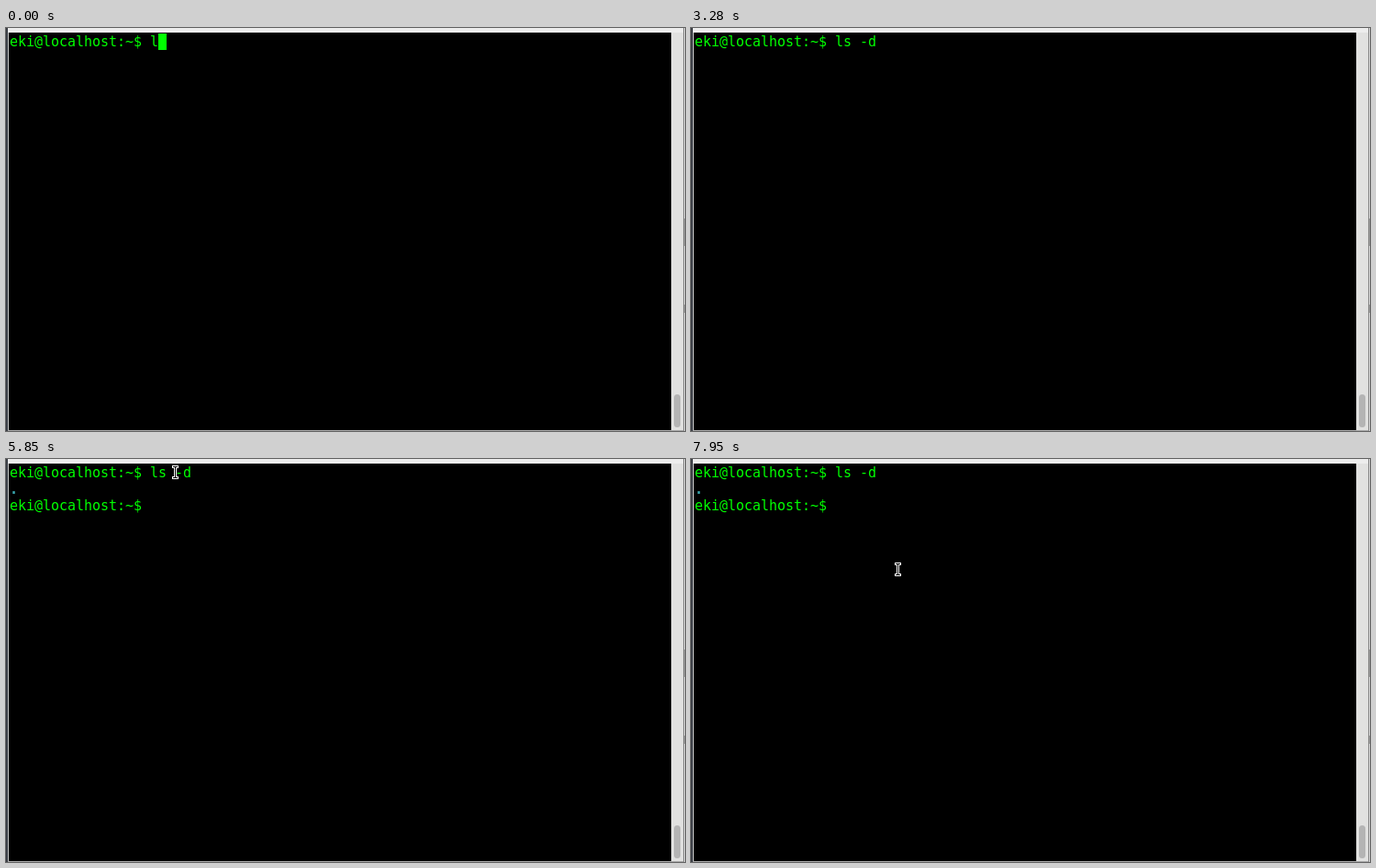
Animation, 740 px wide and 440 px high, one loop 8 s. Source, as an HTML page:

```html
<!DOCTYPE html>
<html lang="en">
<head>
<meta charset="utf-8">
<title>Terminal</title>
<style>
html, body { margin: 0; width: 100%; height: 100%; overflow: hidden; background: #000; }
#stage { position: relative; width: 740px; height: 440px; overflow: hidden; background: #000; }
#stage div, #stage svg { position: absolute; }

/* window frame */
.left { left: 0; top: 0; width: 2px; height: 440px; background: #3c3f46; }
.edge { left: 2px; top: 0; width: 1px; height: 440px; background: #c8c8c8; }
.top { left: 2px; top: 0; width: 737px; height: 5px; background: #ededed; }
.bottom { left: 2px; top: 439px; width: 737px; height: 1px; background: #a9a9a9; }
.bar { left: 725px; top: 5px; width: 13px; height: 434px; background: #e1e1e0; }
.thumb { left: 728px; top: 400px; width: 7px; height: 36px; border-radius: 3.5px; background: #b4b4b4; }
.right { left: 738px; top: 0; width: 2px; height: 440px;
  background: linear-gradient(#8a8a8a, #8a8a8a) 0 0 / 1px 100% no-repeat,
    linear-gradient(#999 0 0) 1px 208px / 1px 30px no-repeat,
    linear-gradient(#999 0 0) 1px 302px / 1px 9px no-repeat, #d6d6d6; }

/* text grid: 9 x 18 cells */
.row { left: 4px; height: 18px; font: 15px/18px "DejaVu Sans Mono", monospace;
  letter-spacing: -.031px; white-space: pre; color: #0f0; }
.dir { color: #3aa8b0; font-weight: bold; }
.typed { left: 157px; top: 6px; overflow: hidden; }
.select { left: 184px; top: 6px; width: 0; overflow: hidden; background: #0f0; color: #000; }
.caret { left: 0; top: 0; width: 9px; height: 18px; background: #0f0; }
.pointer { left: 0; top: 0; }

.typed, .reply, .select, .caret, .pointer {
  animation: 8s step-end -4ms infinite; }
.typed { animation-name: type; }
.reply { animation-name: reply; }
.select { animation-name: select; }
.caret { animation-name: advance, blink; }
.pointer { animation-name: move, appear; }

@keyframes type {
  0% { width: 9px }
  .75% { width: 18px }
  9.5% { width: 27px }
  21% { width: 36px }
  34.125%, 100% { width: 45px }
}
@keyframes reply {
  0% { opacity: 0 }
  45.625%, 100% { opacity: 1 }
}
@keyframes advance {
  0% { transform: translate(166px, 6px) }
  .75% { transform: translate(175px, 6px) }
  9.5% { transform: translate(184px, 6px) }
  21% { transform: translate(193px, 6px) }
  34.125% { transform: translate(202px, 6px) }
  45.625%, 100% { transform: translate(157px, 42px) }
}
@keyframes blink {
  0%, 9%, 20.5%, 33.625%, 44.875%, 59.375%, 73.625%, 88.5% { opacity: 1 }
  7.125%, 16.125%, 27.875%, 41%, 52.375%, 65.875%, 80.25%, 96%, 100% { opacity: 0 }
}
@keyframes select {
  0% { width: 0 }
  79.75% { width: 9px }
  80.75% { width: 18px }
  82% { width: 540px }
  99.375%, 100% { width: 0 }
}
@keyframes appear {
  0% { opacity: 0 }
  57.75%, 100% { opacity: 1 }
}
@keyframes move {
  0%, 57.75% { transform: translate(647px, 269px) }
  58.25% { transform: translate(647px, 269px); animation-timing-function: steps(4, start) }
  60.375% { transform: translate(314px, 209px) }
  62.375% { transform: translate(314px, 209px); animation-timing-function: steps(7, start) }
  65.875% { transform: translate(203px, 77px); animation-timing-function: steps(5, start) }
  68.5% { transform: translate(188px, 28px); animation-timing-function: steps(8, start) }
  72.625% { transform: translate(182px, 8px) }
  73.125% { transform: translate(181px, 7px) }
  74.125% { transform: translate(181px, 5px) }
  74.875% { transform: translate(181px, 3px) }
  79.25% { transform: translate(181px, 3px); animation-timing-function: steps(9, start) }
  84.5% { transform: translate(211px, 10px) }
  88.5% { transform: translate(212px, 12px) }
  89% { transform: translate(212px, 12px); animation-timing-function: steps(5, start) }
  91.5%, 100% { transform: translate(222px, 113px) }
}
</style>
</head>
<body>
<div id="stage">
  <div class="left"></div>
  <div class="edge"></div>
  <div class="top"></div>
  <div class="bottom"></div>
  <div class="bar"></div>
  <div class="thumb"></div>
  <div class="right"></div>

  <div class="row" style="top:6px">eki@localhost:~$</div>
  <div class="row typed">ls -d</div>
  <div class="row reply dir" style="top:24px">.</div>
  <div class="row reply" style="top:42px">eki@localhost:~$</div>
  <div class="row select">-d</div>
  <div class="caret"></div>

  <svg class="pointer" width="7" height="15" shape-rendering="crispEdges">
    <path fill="#fff" d="M0 0h7v3h-2v9h2v3h-7v-3h2v-9h-2z"/>
    <path d="M1 1h5v1h-2v11h2v1h-5v-1h2v-11h-2z"/>
  </svg>
</div>
</body>
</html>
```
